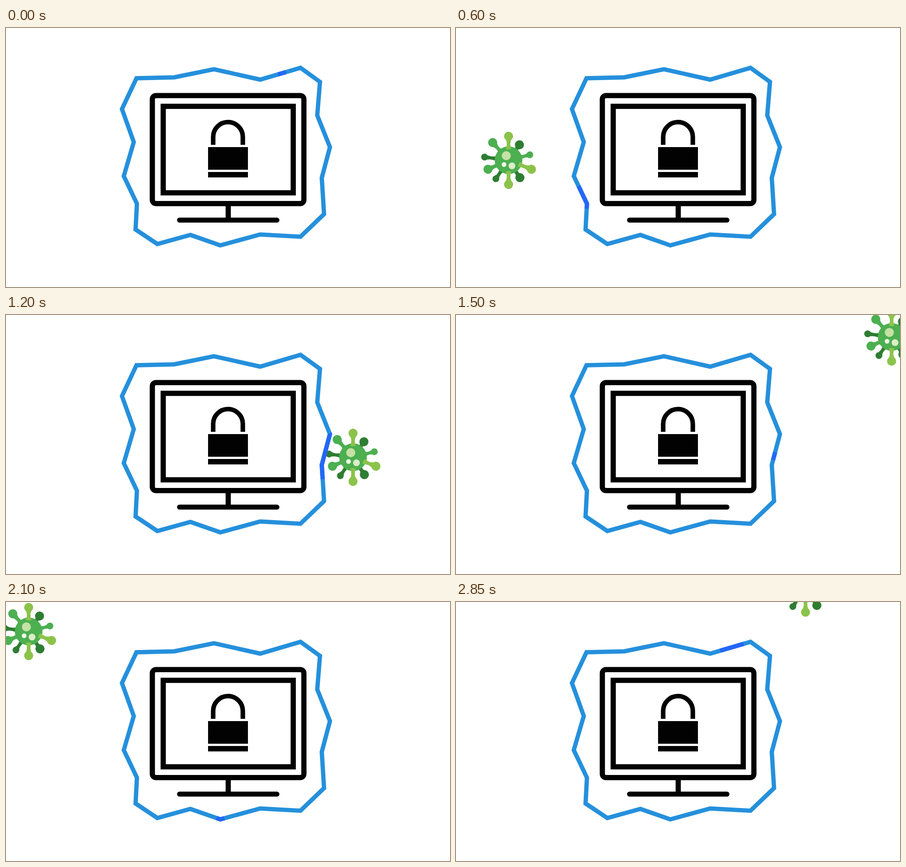
Write an HTML page that moves like this. It is 980 px wide and 572 px high and loops after 3 s.

```html
<!DOCTYPE html>
<html lang="en">
<head>
<meta charset="utf-8">
<title>Locked computer behind a shield</title>
<style>
  html, body { margin: 0; width: 980px; height: 572px; overflow: hidden; background: #fff; }
  svg { display: block; }
</style>
</head>
<body>
<svg width="980" height="572" viewBox="0 0 980 572" fill="none">
  <g id="virus"></g>
  <g stroke-width="9.5" stroke-miterlimit="6">
    <path id="shield" stroke="#2590dc"/>
    <path id="glow" stroke="#2467f6"/>
  </g>
  <g id="computer" stroke="#010201" stroke-width="11.5">
    <rect x="323" y="149.3" width="334.5" height="238.5" rx="8"/>
    <rect x="347" y="173" width="287" height="191"/>
    <path d="M490.5 392V424"/>
    <path d="M383 424.3H598" stroke-linecap="round" stroke-width="11"/>
    <path d="M457.3 258V240.5A32.7 32.7 0 0 1 522.7 240.5V258" stroke-width="10"/>
    <path d="M446 263h88v50h-88zM446 318h88v12h-88z" fill="#010201" stroke="none"/>
  </g>
</svg>
<script>
const GREEN = '#4caf50', DARK = '#2e7d32', LIGHT = '#8bc34a';
const STEP = 150, STEPS = 20;

const virus = document.getElementById('virus');
const shield = document.getElementById('shield');
const glow = document.getElementById('glow');

const circle = (x, y, r, fill) => `<circle cx="${x}" cy="${y}" r="${r}" fill="${fill}"/>`;

// A spike: a waisted stalk from the body out to a ball at (x, y).
function spike([x, y, r, fill]) {
  const d = Math.hypot(x, y), angle = Math.atan2(y, x) * 180 / Math.PI;
  const mid = (d + 25) / 2, w = r * 0.8, end = d - r * 0.4;
  return `<g transform="rotate(${angle})" fill="${fill}">
    <path d="M25 -6Q${mid} -1 ${end} ${-w}V${w}Q${mid} 1 25 6Q23 0 25 -6Z"/>
    <circle cx="${d}" r="${r}"/></g>`;
}

const backSpikes = [
  [-35, -39, 10, GREEN], [24, -34, 10, DARK], [47, -12, 7.5, GREEN], [25, 38.5, 10, DARK],
  [-28, 41, 7.5, DARK], [-45.5, 20, 10, GREEN], [-53, -7, 7.5, DARK]
];
const frontSpikes = [[0, -53, 10, LIGHT], [50.5, 20, 10, LIGHT], [0, 53.5, 10, LIGHT]];

virus.innerHTML = backSpikes.map(spike).join('') + circle(0, 0, 30.5, GREEN) +
  frontSpikes.map(spike).join('') +
  circle(-5, -10, 10, '#c5e1a5') + circle(-10, 9.5, 5.2, '#f1f8e9') + circle(7.5, 12.5, 7.5, '#dcedc8');

const outline = 'M371 109L459 91 561 114 650 88 693 119 687 193 715 263 697 331 702 411 650 461 ' +
  '561 456 473 480 407 457 334 477 286 445 289 388 260 327 282 252 256 179 288 111Z';
shield.setAttribute('d', outline);
glow.setAttribute('d', outline);

// Each attack: first step, step of the hit, place of the hit along the outline, virus positions.
const attacks = [
  { start: 1, hit: 3, at: 1169, path: [[33, 515], [127.5, 454], [222, 393], [116, 292], [47, 226]] },
  { start: 6, hit: 8, at: 540, path: [[925, 555], [816.5, 433], [766, 314], [857, 180], [961.5, 48.5]] },
  { start: 11, hit: 12, at: 892.6, path: [[588, 600], [467.5, 546], [348, 600]] },
  { start: 14, hit: 15, at: 1413, path: [[50, 65], [199, 126], [257, -6]] },
  { start: 17, hit: 18, at: 244.4, path: [[452, -27], [603.5, 34], [771.5, -31]] }
];
const glowHalf = [52, 27, 9];

function draw(step) {
  let position = null, half = 0, at = 0;
  for (const attack of attacks) {
    position = attack.path[step - attack.start] || position;
    const age = (step - attack.hit + STEPS) % STEPS;
    if (age < glowHalf.length) {
      half = glowHalf[age];
      at = attack.at;
    }
  }
  virus.style.display = position ? '' : 'none';
  if (position) virus.setAttribute('transform', `translate(${position})`);
  glow.style.display = half ? '' : 'none';
  glow.setAttribute('stroke-dasharray', `0 ${at - half} ${2 * half} 9999`);
}

function tick() {
  draw(Math.floor(performance.now() / STEP) % STEPS);
  requestAnimationFrame(tick);
}
tick();
</script>
</body>
</html>
```
